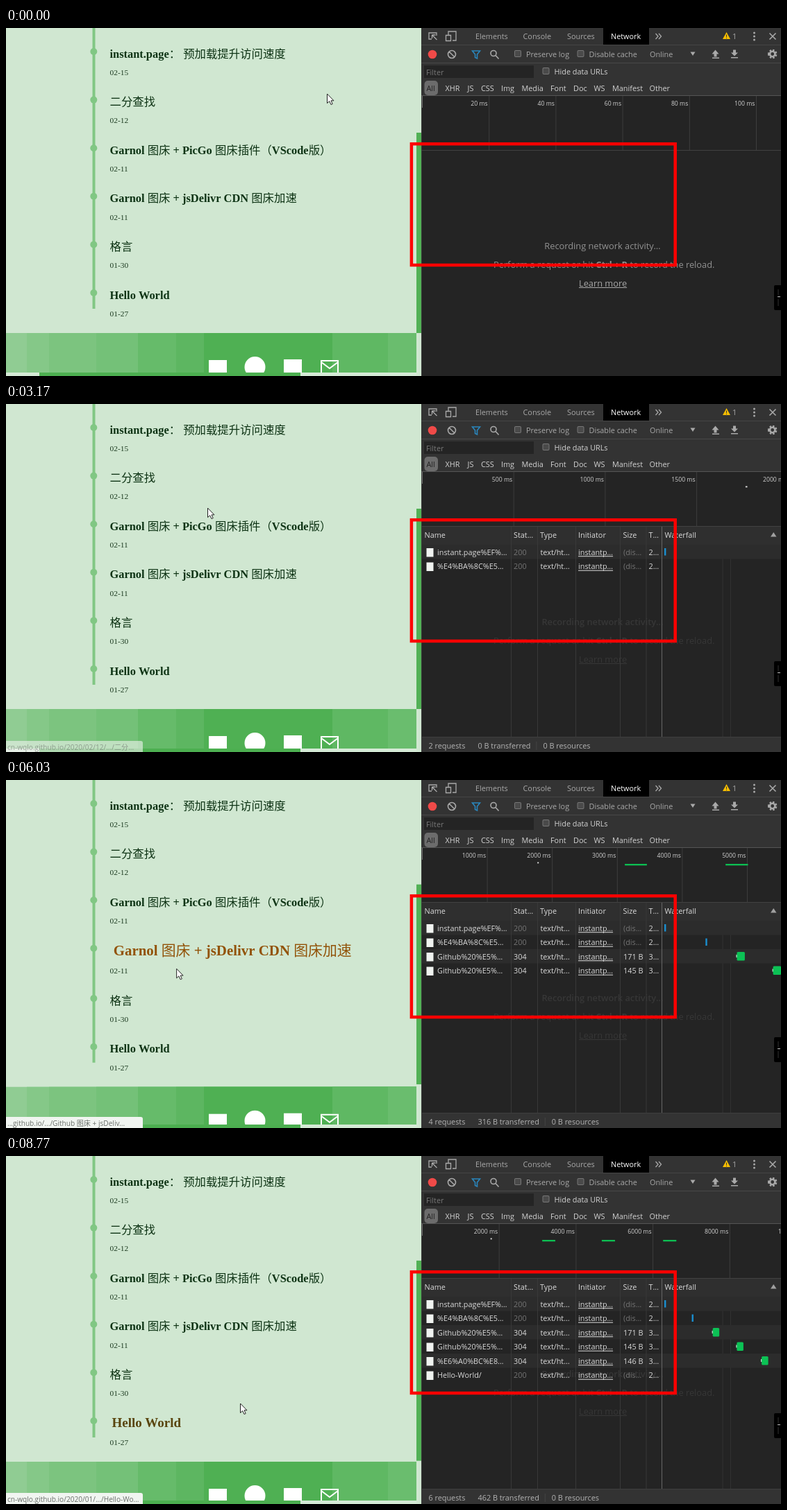
Write an HTML page with a canvas that moves like this. It is 1116x502 px and loops after 8.8 s.

```html
<!DOCTYPE html>
<html lang="zh">
<head>
<meta charset="utf-8">
<style>
html, body { margin: 0; width: 100%; height: 100%; overflow: hidden; background: #242424; }
canvas { display: block; }
</style>
</head>
<body>
<canvas id="stage" width="1116" height="502"></canvas>
<script>
const LOOP = 8800, FADE = 300;
const c = document.getElementById('stage').getContext('2d');
const SANS = '"Open Sans", "Noto Sans", "Noto Sans CJK SC", sans-serif';
const SERIF = '"Liberation Serif", "Noto Sans CJK SC", serif';

// Blog posts: title, date, pointer enters, pointer leaves
const posts = [
  ['instant.page： 预加载提升访问速度', '02-15', 250, 1150],
  ['二分查找', '02-12', 2000, 2800],
  ['Garnol 图床 + PicGo 图床插件（VScode版）', '02-11', 3380, 4266],
  ['Garnol 图床 + jsDelivr CDN 图床加速', '02-11', 4880, 5950],
  ['格言', '01-30', 6430, 7150],
  ['Hello World', '01-27', 7800, 8650]
];
// Link preview: text, appears, is gone
const previews = [
  ['cn-wqlo.github.io/2020/02/15/.../insta...', 350, 1500],
  ['cn-wqlo.github.io/2020/02/12/.../二分...', 2200, 3320],
  ['...github.io/.../Github 图床 + PicGo 图...', 3500, 4760],
  ['...github.io/.../Github 图床 + jsDeliv...', 5225, 6340],
  ['cn-wqlo.github.io/2020/01/30/杂/.../格...', 6550, 7600],
  ['cn-wqlo.github.io/2020/01/.../Hello-Wo...', 7880, 9200]
];
// Requests: name, listed at, answered at, bytes (0 = cached), start and end on the time axis
const requests = [
  ['instant.page%EF%…', 300, 300, 0, 0, 20],
  ['%E4%BA%8C%E5…', 2080, 2080, 0, 1765, 1775],
  ['Github%20%E5%…', 3480, 3760, 171, 3110, 3450],
  ['Github%20%E5%…', 4960, 5320, 145, 4660, 5005],
  ['%E6%A0%BC%E8…', 6560, 6700, 146, 6255, 6600],
  ['Hello-World/', 7900, 7900, 0, 7990, 8000]
];
// Time axis: from, ms per tick, px per tick, waterfall px per ms
const scales = [
  [0, 20, 96.2, 0], [2080, 500, 131.7, 0.0952], [3480, 500, 67.3, 0.0493],
  [4960, 1000, 107.7, 0.0365], [5320, 1000, 93.6, 0.0336],
  [6560, 1000, 69.2, 0.0273], [7900, 2000, 110.7, 0.0224]
];
const pointer = [
  [0, 462, 95], [30, 462, 95], [250, 390, 52], [840, 295, 36], [1000, 295, 36],
  [1150, 291, 56], [1500, 287, 82], [1690, 287, 82], [1850, 285, 104], [2000, 215, 108],
  [2550, 190, 108], [2800, 224, 116], [3170, 290, 150], [3450, 293, 170], [4266, 294, 191],
  [4360, 295, 205], [4880, 296, 236], [5200, 296, 249], [5780, 296, 249], [5950, 260, 265],
  [6430, 172, 308], [6640, 161, 318], [6990, 161, 318], [7150, 172, 332], [7840, 208, 380],
  [8430, 215, 382], [8770, 337, 357], [8800, 337, 357]
];
const bands = [
  [0, '#90cc93'], [30, '#85c888'], [62, '#7cc47f'], [130, '#74c178'], [190, '#66bb6a'],
  [245, '#5db661'], [285, '#4fb053'], [470, '#5fb863'], [550, '#6abd6e']
];

const clamp = x => Math.max(0, Math.min(1, x));

// CSS "ease" curve
function ease(x) {
  x = clamp(x);
  let lo = 0, hi = 1, u = 0.5;
  for (let i = 0; i < 16; i++, u = (lo + hi) / 2) {
    const bx = 0.75 * u * (1 - u) + u ** 3;
    if (bx < x) lo = u; else hi = u;
  }
  return 0.3 * u * (1 - u) ** 2 + 3 * u * u * (1 - u) + u ** 3;
}

function rect(x, y, w, h, color) {
  c.fillStyle = color;
  c.fillRect(x, y, w, h);
}

function dot(x, y, r, color) {
  c.fillStyle = color;
  c.beginPath();
  c.arc(x, y, r, 0, 7);
  c.fill();
}

function rounded(x, y, w, h, r, color) {
  c.fillStyle = color;
  c.beginPath();
  c.roundRect(x, y, w, h, r);
  c.fill();
}

function stroke(d, color, width = 1.3) {
  c.strokeStyle = color;
  c.lineWidth = width;
  c.stroke(new Path2D(d));
}

function shape(d, color) {
  c.fillStyle = color;
  c.fill(new Path2D(d));
}

function text(s, x, y, color, size = 10.85, font = SANS, weight = '', align = 'left') {
  c.font = `${weight} ${size}px ${font}`;
  c.fillStyle = color;
  c.textAlign = align;
  c.fillText(s, x, y);
  return c.measureText(s).width;
}

function link(s, x, y, color, size) {
  const w = text(s, x, y, color, size);
  rect(x, y + 1.5, w, 1, color);
}

// Latin runs are bold, Chinese runs are regular
function title(s, x, y, size, color) {
  for (const run of s.split(/([^\x00-\x7f]+)/))
    x += text(run, x, y, color, size, SERIF, /[^\x00-\x7f]/.test(run) ? '' : 'bold');
}

function mix(a, b, p) {
  return `rgb(${a.map((v, i) => Math.round(v + (b[i] - v) * p))})`;
}

function drawBlog(t) {
  rect(0, 0, 598, 502, '#d0e7d1');
  const hover = posts.map(([, , enter, leave]) => ease((t - enter) / FADE) - ease((t - leave) / FADE));
  const grow = hover.map(p => 8 * p ** 1.8);
  const total = grow.reduce((a, b) => a + b);
  rect(124.5, 0, 4, 405 + total, '#81c784');
  let shift = 0;
  posts.forEach(([name, date], i) => {
    const p = hover[i], y = 69.6 * i + shift;
    dot(126.3, 34 + y, 5, '#81c784');
    title(name, 149.5 + 9.5 * p, 42.5 + y + 0.75 * grow[i], 16.4 * (1 + p / 2), mix([13, 51, 20], [255, 109, 0], p));
    shift += grow[i];
    text(date, 149.5, 67.8 + 69.6 * i + shift, '#1d3b21', 11.4, SERIF);
  });

  const top = 440 + total;
  bands.forEach(([x, color]) => rect(x, top, 591 - x, 62, color));
  rect(292, top + 39, 26, 26, '#fff');
  dot(358.5, top + 49, 15, '#fff');
  rect(400, top + 38, 26, 26, '#fff');
  c.save();
  c.translate(0, total);
  stroke('M454 480h24v20h-24zM454 482l12 9 12-9', '#fff', 2);
  c.restore();

  rect(0, 497, 598, 5, '#d5ead6');
  rect(48, 497, 376, 5, '#4caf50');
  rect(591, 0, 7.5, 502, '#d0e7d1');
  rect(591, 151 - total / 8, 7.5, 289 - total / 4, '#52b156');

  for (const [label, from, to] of previews) {
    if (t < from || t > to) continue;
    c.globalAlpha = Math.min(1, (t - from) / 180, (to - t) / 250);
    rounded(-4, 486, 201, 20, 3, '#f1f5f1');
    text(label, 2, 499, '#6a6f6a', 10.1);
    c.globalAlpha = 1;
  }
}

function checkbox(x, y) {
  rounded(x, y, 10, 10, 2, '#777');
  rounded(x + 1, y + 1, 8, 8, 1, '#4a4a4a');
}

function drawToolbar() {
  const grey = '#a9a9a9', light = '#d2d2d2';
  rect(598, 0, 518, 98, '#333');
  rect(860, 0, 66, 24, '#000');
  rect(598, 24, 518, 1, '#454545');
  rect(598, 50, 518, 1, '#484848');
  rect(598, 97, 518, 1, '#555');
  [['Elements', 676], ['Console', 744.5], ['Sources', 808]].forEach(([s, x]) => text(s, x, 16, grey));
  text('Network', 871, 16, '#fff');
  stroke('M613 16h-4v-9h11v4M613.5 10l7 7M613.5 10v5M613.5 10h5', grey);
  stroke('M637 10v-5h11v13h-5M633.5 10.5h7v8h-7z', grey);
  stroke('M935.5 8l3.5 4-3.5 4M940 8l3.5 4-3.5 4', grey);
  shape('M1037.5 6l5.5 10h-11z', '#f5bd00');
  rect(1037, 9.5, 1, 3.5, '#333');
  rect(1037, 14, 1, 1, '#333');
  text('1', 1046, 16, grey);
  [7, 12, 17].forEach(y => dot(1077.5, y, 1.5, grey));
  stroke('M1099.5 7.5l9 9M1108.5 7.5l-9 9', grey, 1.6);

  dot(614, 38, 6.3, '#f04a48');
  stroke('M636.5 38a5.5 5.5 0 1 0 11 0a5.5 5.5 0 1 0-11 0M638 34l8 8', grey, 1.6);
  stroke('M671.5 33h11l-4 5v6l-3-1.5v-4.500z', '#2a86bd', 1.6);
  stroke('M698 36.500a4 4 0 1 0 8 0a4 4 0 1 0-8 0M705 39.500l4.500 5', grey, 1.6);
  checkbox(732, 32);
  text('Preserve log', 749, 42, grey);
  checkbox(822.5, 32);
  text('Disable cache', 839.5, 42, grey);
  text('Online', 927, 42, grey);
  shape('M985.5 34.500h7l-3.500 5.500z', grey);
  shape('M1021.500 31.500l5 6h-3v4h-4v-4h-3zM1017 42.500h10v1.500h-10z', grey);
  shape('M1049 40.500l5-5h-3v-4h-4v4h-3zM1044 42h10v1.500h-10z', grey);
  c.setLineDash([2.4, 2.1]);
  stroke('M1098.200 37.500a5.500 5.500 0 1 0 11 0a5.500 5.500 0 1 0-11 0', grey, 2.5);
  c.setLineDash([]);
  stroke('M1100 37.500a3.700 3.700 0 1 0 7.400 0a3.700 3.700 0 1 0-7.400 0', grey, 2.6);

  rect(602, 54, 158, 18, '#242424');
  text('Filter', 605, 67.5, '#777');
  checkbox(772.5, 57);
  text('Hide data URLs', 789.5, 67, light);
  rounded(602.5, 76, 19.5, 21, 5, '#6c6c6c');
  [['All', 605.5], ['XHR', 632.5], ['JS', 664.5], ['CSS', 684], ['Img', 713], ['Media', 742.5],
   ['Font', 784], ['Doc', 817], ['WS', 846.5], ['Manifest', 873], ['Other', 926.5]]
    .forEach(([s, x], i) => text(s, x, 91, i ? light : '#222'));
}

function drawAxis(t, [, tickMs, tickPx]) {
  for (let i = 1; i < 10; i++) {
    const x = 599 + i * tickPx;
    rect(x, 98, 1, 78, '#3d3d3d');
    text(`${i * tickMs} ms`, x - 1.5, 112, '#d0d0d0', 8.7, SANS, '', 'right');
  }
  rect(599, 98, 1, 17, '#777');
  rect(598, 176, 518, 1, '#414141');
  for (const [, , done, bytes, start, end] of requests) {
    if (t < done || start > 7000) continue;
    const x = 600 + start / tickMs * tickPx, w = (end - start) / tickMs * tickPx;
    if (bytes) rect(x, 121, w, 2.3, '#0cbf52');
    else if (start || tickMs === 20) rect(x, 118.5, Math.max(2, Math.min(w, 18)), 1.8, '#e4e4e4');
  }
}

function drawHint(listed) {
  const color = listed ? '#373737' : '#929292', size = 12.8, weight = listed ? 600 : '';
  text('Recording network activity…', 859, 318.5, color, size, SANS, weight, 'center');
  let x = 702;
  x += text('Perform a request or hit ', x, 345.5, color, size);
  x += text('Ctrl + R', x, 345.5, color, size, SANS, 'bold');
  text(' to record the reload.', x, 345.5, color, size);
  link('Learn more', 825, 372.5, listed ? color : '#a8a8a8', size);
}

function drawRow([name, , done, bytes, start, end], i, t, pxPerMs) {
  const y = 203 + 20.5 * i, base = y + 14.7;
  const white = '#dadada', dim = '#747474', ready = t >= done;
  if (i % 2 === 0) rect(599, y, 517, 20.5, '#2c2c2c');
  rect(605.5, y + 5, 10, 12.5, '#f0f3f0');
  text(name, 621, base, white);
  text(ready ? (bytes ? '304' : '200') : '(pe…', 731, base, bytes && ready ? white : dim);
  if (ready) text('text/ht…', 769.5, base, white);
  link('instantp…', 824, base, white);
  if (bytes) text(ready ? bytes + ' B' : '0 B', 917.5, base, white, 10.85, SANS, '', 'right');
  else text('(dis…', 889, base, dim);
  text(ready ? (bytes ? '3…' : '2…') : 'P…', 925.5, base, ready ? white : dim);

  const x = 948 + start * pxPerMs;
  if (!ready) return;
  if (!pxPerMs) {
    rect(948.5, y + 6, 4.5, 7, '#e8f2ec');
    rect(952.5, y + 3.5, 3.5, 12.5, '#1a9fe0');
  } else if (bytes) {
    rect(x - 1, y + 8, 2, 4, '#d8efe0');
    rounded(x, y + 4, Math.max(9.5, (end - start) * pxPerMs), 12.5, 1.5, '#0cc255');
  } else {
    rect(x, y + 5, 2.4, 10.5, '#1a8fd0');
  }
}

function drawTable(t, pxPerMs) {
  const rows = requests.filter(r => t >= r[1]);
  drawHint(rows.length > 0);
  if (!rows.length) return;
  rect(599, 177, 517, 26, '#2f2f2f');
  [['Name', 602.5], ['Stat…', 731], ['Type', 769], ['Initiator', 824], ['Size', 888.5], ['T…', 925.5], ['Waterfall', 948.5]]
    .forEach(([s, x]) => text(s, x, 192.5, '#dadada'));
  shape('M1101 191.500h8.500l-4.250-6.500z', '#a0a0a0');
  [1031.5, 1043].forEach((x, i) => (i && !pxPerMs) || rect(x, 203, 1, 278, '#323232'));
  rows.forEach((r, i) => drawRow(r, i, t, pxPerMs));
  [727, 765, 820, 884, 921.5].forEach(x => rect(x, 177, 1, 304, '#393939'));
  rect(944, 177, 1, 304, '#666');

  rect(599, 481, 517, 21, '#333');
  rect(599, 480, 517, 1, '#3e3e3e');
  const sum = rows.reduce((n, r) => n + (t >= r[2] ? r[3] : 0), 0);
  text(`${rows.length} requests`, 608.5, 497, '#b4b4b4');
  const w = text(`${sum} B transferred`, 679.5, 497, '#b4b4b4');
  rect(679.5 + w + 8, 487, 1, 12, '#444');
  text('0 B resources', 679.5 + w + 18, 497, '#b4b4b4');
}

function drawPointer(t) {
  const i = pointer.findIndex(k => k[0] > t);
  const [t0, x0, y0] = pointer[i - 1], [t1, x1, y1] = pointer[i];
  const p = (t - t0) / (t1 - t0);
  c.save();
  c.translate(x0 + (x1 - x0) * p + 0.5, y0 + (y1 - y0) * p);
  const arrow = 'M0 0V13.500L3.200 10.600L5.500 15.500L7.700 14.500L5.500 9.800H9.500Z';
  shape(arrow, '#fff');
  stroke(arrow, '#222', 1);
  c.restore();
}

function draw() {
  const t = performance.now() % LOOP;
  const scale = scales.filter(s => t >= s[0]).pop();
  rect(0, 0, 1116, 502, '#242424');
  drawBlog(t);
  rect(598, 0, 1, 502, '#3a3a3a');
  drawToolbar();
  drawAxis(t, scale);
  drawTable(t, scale[3]);
  c.strokeStyle = '#f00';
  c.lineWidth = 4.5;
  c.strokeRect(583.9, 167.2, 379.8, 174.8);
  rounded(1106, 371, 14, 36, 2, '#000');
  rect(1111.5, 377, 1, 8, '#333');
  rect(1111, 387, 4, 1.2, '#aaa');
  rect(1111.5, 391, 1, 10, '#333');
  drawPointer(t);
  requestAnimationFrame(draw);
}
draw();
</script>
</body>
</html>
```
